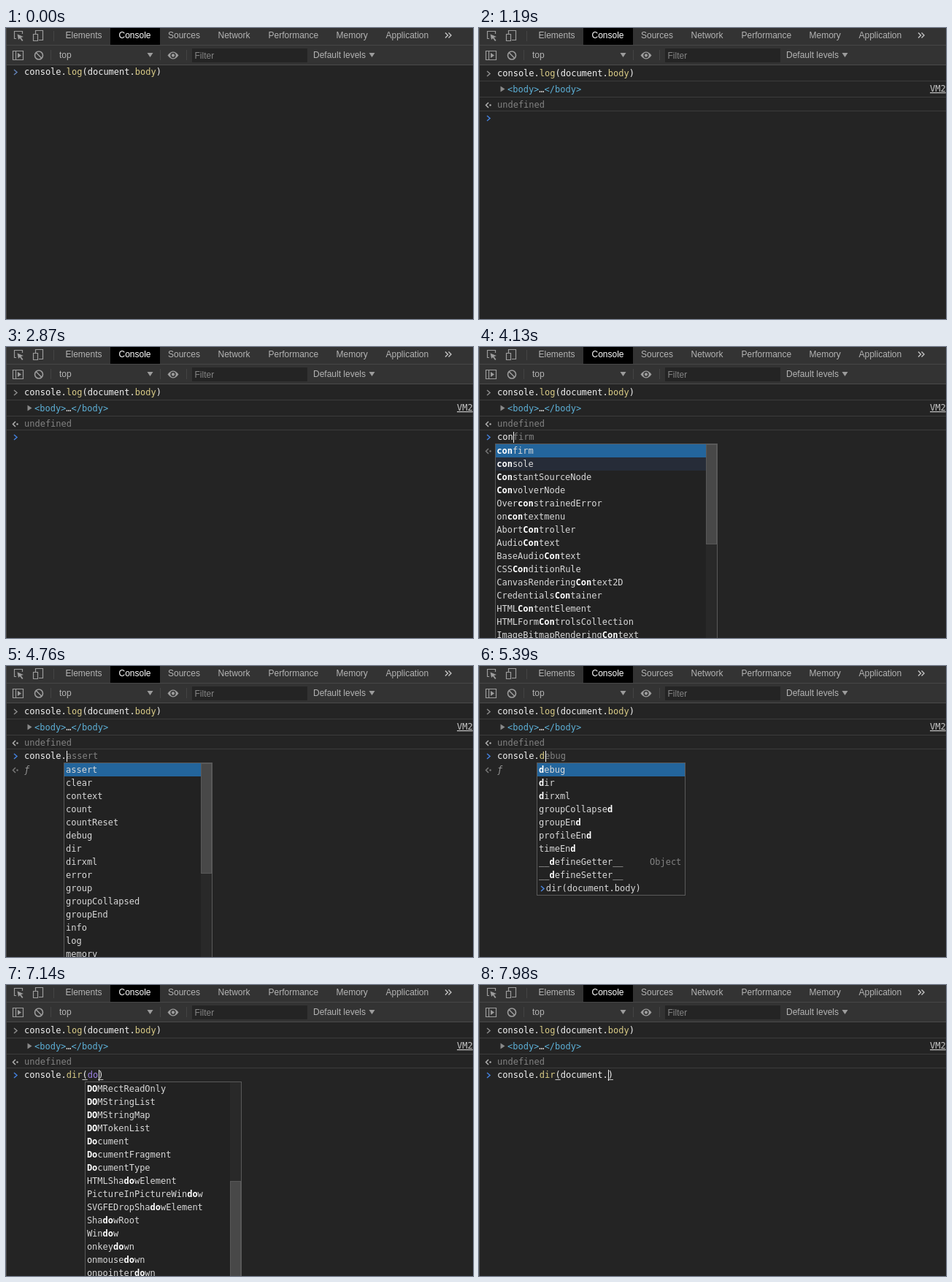
An HTML page for the animation above (8000 ms loop, 640 px wide and 398 px high).

```html
<!DOCTYPE html>
<html lang="en">
<head>
<meta charset="utf-8">
<title>Console session</title>
<style>
  html, body { margin: 0; width: 100%; height: 100%; overflow: hidden; background: #242424; }
  svg { display: block; width: 640px; height: 398px; }
  text { white-space: pre; fill: #d8d8d8; font: 12px "DejaVu Sans Mono", monospace; }
  .ui text { fill: #b4b4b4; font: 12px "Liberation Sans", sans-serif; }
  .ui text.on { fill: #fff; }
  .ui text.dim { fill: #858585; }
  .icon { fill: none; stroke: #9c9c9c; stroke-width: 1.2; }
  .rule { fill: #3c3c3c; }
  .code { fill: #f2f2f2; }
  .prop { fill: #d9cb86; }
  .key { fill: #9d83e6; }
  .tag { fill: #5db0d7; }
  .attr { fill: #9bbbdc; }
  .val { fill: #f29766; }
  .link { fill: #c4c4c4; text-decoration: underline; }
  .gray { fill: #828282; }
  .fn { fill: #9a9a9a; font-style: italic; }
  .hit { fill: #fff; font-weight: bold; }
  .chev { fill: none; stroke-width: 1.5; }
</style>
</head>
<body>
<svg viewBox="0 0 640 398">
  <rect width="640" height="398" fill="#242424"/>
  <g id="log"></g>
  <g class="ui">
    <rect width="640" height="50" fill="#333"/>
    <rect y="23" width="640" height="1" fill="#474747"/>
    <rect y="50" width="640" height="1" fill="#4a4a4a"/>
    <rect x="143" width="68" height="23" fill="#000"/>
    <path d="M65.5 4V18M61.5 30V44M211.5 30V44M247.5 30V44" stroke="#444"/>
    <g class="icon">
      <path d="M14 14.5H11.5V4.5H22.5V8"/>
      <path d="M15.5 8.5L24 12L20.5 13L23.5 17L22 18L19 14L17 16Z" fill="#9c9c9c" stroke="none"/>
      <path d="M40.5 8V3.5H50.5V16.5H45M37.5 8.5H43.5V17.5H37.5Z"/>
      <path d="M9.500 31.500H23.500V43.500H9.500ZM13.500 31.500V43.500"/>
      <path d="M16 34L21 37.500L16 41Z" fill="#9c9c9c" stroke="none"/>
      <circle cx="45" cy="37.500" r="5.500" stroke-width="1.600"/>
      <path d="M41 33.500L49 41.500" stroke-width="1.600"/>
      <path d="M221.500 37.500Q229 27.500 236.500 37.500Q229 47.500 221.500 37.500Z" fill="#9c9c9c" stroke="none"/>
      <circle cx="229" cy="37.500" r="2.900" stroke="#333" stroke-width="1.500"/>
      <path d="M602 6.500L605.500 10L602 13.500M606.500 6.500L610 10L606.500 13.500" stroke="#c4c4c4" stroke-width="1.400"/>
    </g>
    <path d="M193.500 34H201.500L197.500 40ZM497.500 34H505.500L501.500 40Z" fill="#9c9c9c"/>
    <rect x="255" y="28" width="158" height="19" fill="#242424"/>
    <text x="81.500" y="14">Elements</text>
    <text x="154.500" y="14" class="on">Console</text>
    <text x="222" y="14">Sources</text>
    <text x="290.500" y="14">Network</text>
    <text x="359.500" y="14">Performance</text>
    <text x="452.500" y="14">Memory</text>
    <text x="520.500" y="14">Application</text>
    <text x="73" y="41">top</text>
    <text x="258.500" y="42" class="dim">Filter</text>
    <text x="421" y="41">Default levels</text>
  </g>
  <g id="prompt"></g>
  <rect width="1" height="398" fill="#4c4c4c"/>
</svg>
<script>
const LOOP = 8000, CHAR = 7.224, LEFT = 25;
const logLayer = document.getElementById('log');
const promptLayer = document.getElementById('prompt');

const esc = s => s.replace(/&/g, '&amp;').replace(/</g, '&lt;');
const span = (cls, s) => `<tspan class="${cls}">${esc(s)}</tspan>`;
const line = (x, cy, body) => `<text x="${x}" y="${cy + 4}">${body}</text>`;
const box = (x, y, w, h, fill, extra = '') =>
  `<rect x="${x}" y="${y}" width="${w}" height="${h}" fill="${fill}" ${extra}/>`;
const rule = y => `<rect class="rule" x="1" y="${y}" width="639" height="1"/>`;
const chevron = (x, y, color) =>
  `<path class="chev" stroke="${color}" d="M${x - 2} ${y - 3}l4 3.500l-4 3.500"/>`;
const resultMark = (y, color) =>
  `<path class="chev" stroke="${color}" d="M13 ${y - 3}l-3.500 3.500l3.500 3.500"/>` +
  `<circle cx="15.500" cy="${y + .5}" r="1.200" fill="${color}"/>`;
const arrow = (x, y, open) =>
  `<path fill="#8a8a8a" d="${open ? `M${x - 4} ${y - 2}h8l-4 6z` : `M${x - 2.5} ${y - 3.5}v8l6-4z`}"/>`;

function highlight(code) {
  return code.split(/(\.\w+|\bdo\b)/).map(s =>
    s === 'do' ? span('key', s)
    : /^\.\w/.test(s) ? span('code', '.') + span('prop', s.slice(1))
    : span('code', s)).join('');
}

const COMMAND = 'console.log(document.body)';

function scriptRows(file, y) {
  return line(51, y, span('tag', '<script ') + span('attr', 'type') + span('tag', '="') +
      span('val', 'text/javascript') + span('tag', '" ') + span('attr', 'src') + span('tag', '="') +
      span('link', 'https://b-gold-cdn.xitu.io/v3/static/js/')) +
    line(51, y + 16, span('link', file) + span('tag', '"><\/script>'));
}

function history(open) {
  const end = open ? 252 : 105;
  let out = chevron(13, 62, '#8c8c8c') + line(LEFT, 62, highlight(COMMAND)) + rule(open ? 71 : 72) +
    line(618, open ? 82 : 83, span('link', 'VM2'));
  if (open) {
    out += arrow(32.5, 97, true) + line(39, 98, span('tag', '<body>')) +
      arrow(44, 114, false) +
      line(51, 115, span('tag', '<div ') + span('attr', 'id') + span('tag', '="') + span('val', 'juejin') +
        span('tag', '" ') + span('attr', 'data-v-5cbcd4ce') + span('tag', '>') + '…' + span('tag', '</div>')) +
      scriptRows('runtime.eedcca2….js', 132) +
      scriptRows('0.a25946e….js', 165) +
      scriptRows('1.87e5c6f….js', 198) +
      line(39, 231, span('tag', '</body>')) + rule(241) + rule(262);
  } else {
    out += arrow(32, 83, false) +
      line(39, 84, span('tag', '<body>') + '…' + span('tag', '</body>')) + rule(94) + rule(113);
  }
  return out + resultMark(end, '#b0b0b0') + line(LEFT, end, span('gray', 'undefined'));
}

// Popups: start column, typed match, outer width, items, optional thumb and selection
const words = s => s.split(' ');
const menus = {
  c: { col: 0, match: 'c', width: 305, thumb: [133, 30], items: words('caches cancelAnimationFrame cancelIdleCallback captureEvents case catch chrome class clear clearInterval clearTimeout clientInformation close closed confirm') },
  co: { col: 0, match: 'co', width: 305, thumb: [133, 80], items: words('confirm console const continue copy Comment CompositionEvent ConstantSourceNode ConvolverNode CountQueuingStrategy decodeURI decodeURIComponent encodeURI encodeURIComponent OverconstrainedError') },
  con: { col: 0, match: 'con', width: 305, thumb: [133, 136], hover: 1, items: words('confirm console ConstantSourceNode ConvolverNode OverconstrainedError oncontextmenu AbortController AudioContext BaseAudioContext CSSConditionRule CanvasRenderingContext2D CredentialsContainer HTMLContentElement HTMLFormControlsCollection ImageBitmapRenderingContext') },
  dot: { col: 8, match: '', width: 204, thumb: [133, 150], items: words('assert clear context count countReset debug dir dirxml error group groupCollapsed groupEnd info log memory') },
  d: { col: 8, match: 'd', width: 204, notes: { 7: 'Object' }, recall: 'dir(document.body)', items: words('debug dir dirxml groupCollapsed groupEnd profileEnd timeEnd __defineGetter__ __defineSetter__') },
  arg: { col: 12, match: 'd', width: 215, thumb: [133, 40], items: words('debug debugger decodeURI decodeURIComponent default defaultStatus defaultstatus delete devicePixelRatio dir dirxml dispatchEvent do document DataTransfer') },
  doTop: { col: 12, match: 'do', width: 215, thumb: [133, 140], items: words('document do DOMError DOMException DOMImplementation DOMMatrix DOMMatrixReadOnly DOMParser DOMPoint DOMPointReadOnly DOMQuad DOMRect DOMRectList DOMRectReadOnly DOMStringList') },
  doEnd: { col: 12, match: 'do', width: 215, thumb: [268, 140], selected: -1, items: words('DOMRectReadOnly DOMStringList DOMStringMap DOMTokenList Document DocumentFragment DocumentType HTMLShadowElement PictureInPictureWindow SVGFEDropShadowElement ShadowRoot Window onkeydown onmousedown onpointerdown') }
};

function marked(word, match) {
  const at = word.toLowerCase().indexOf(match), end = at + match.length;
  if (!match || at < 0) return esc(word);
  return esc(word.slice(0, at)) + span('hit', word.slice(at, end)) + esc(word.slice(end));
}

function popup({ col, match, width, items, thumb, selected = 0, hover, notes = {}, recall }) {
  const start = LEFT + col * CHAR, x = Math.floor(start - 3), inner = width - (thumb ? 16 : 1);
  const height = thumb ? 280 : (items.length + (recall ? 1 : 0)) * 18 + 1;
  let out = box(x + .5, 132.5, width - 1, height, '#222', 'stroke="#5a5a5a"');
  items.forEach((word, i) => {
    const y = 142 + i * 18;
    if (i === selected) out += box(x + 1, y - 9, inner - 1, 18, '#23659c');
    if (i === hover) out += box(x + 1, y - 9, inner - 1, 18, '#262c38');
    out += line(start - .8, y, marked(word, match));
    if (notes[i]) out += line(x + width - 49, y, span('gray', notes[i]));
  });
  if (recall) {
    const y = 142 + items.length * 18;
    out += chevron(x + 8, y, '#4a86e0') + line(start + 9, y, esc(recall));
  }
  if (thumb) {
    out += box(x + inner, 133, 15, 280, '#292929') +
      box(x + inner + .5, thumb[0] + .5, 14, thumb[1], '#484848', 'stroke="#585858"');
  }
  return out;
}

function prompt({ code = '', ghost = '', caret = code.length, menu, preview, y = 123, color = '#4480dc' }) {
  let out = chevron(13, y, color) +
    line(LEFT, y, highlight(code) + span('gray', ghost));
  if (preview !== undefined) out += resultMark(142, '#777') + line(LEFT, 142, span('fn', preview));
  if (code.includes('()') || code.includes('dir(')) {
    [code.indexOf('('), code.length - 1].forEach(i => {
      out += box(LEFT + i * CHAR, 129, CHAR, 1, '#c8c8c8');
    });
  }
  if (menu) out += popup(menus[menu]);
  if (caret >= 0) out += box(Math.round(LEFT + caret * CHAR + .5), y - 7, 1, 15, '#f0f0f0');
  return out;
}

const idle = { caret: -1 };
const steps = [
  [0, '', { code: COMMAND, caret: -1, y: 60, color: '#6180b4' }],
  [560, 'closed', idle],
  [1890, 'open', { caret: -1, y: 271 }],
  [2730, 'closed', idle],
  [3290, 'closed', { code: 'c', ghost: 'aches', menu: 'c' }],
  [3570, 'closed', { code: 'co', ghost: 'nfirm', menu: 'co' }],
  [3850, 'closed', { code: 'con', ghost: 'firm', menu: 'con', preview: '' }],
  [4480, 'closed', { code: 'console', preview: 'console {debug: ƒ, error: ƒ, info: ƒ, log: ƒ, warn: ƒ, …}' }],
  [4760, 'closed', { code: 'console.', ghost: 'assert', menu: 'dot', preview: 'ƒ' }],
  [5110, 'closed', { code: 'console.d', ghost: 'ebug', menu: 'd', preview: 'ƒ' }],
  [5460, 'closed', { code: 'console.dir', preview: 'ƒ dir() { [native code] }' }],
  [5810, 'closed', { code: 'console.dir()', caret: 12 }],
  [6230, 'closed', { code: 'console.dir(d)', caret: 13, menu: 'arg' }],
  [6580, 'closed', { code: 'console.dir(do)', caret: 14, menu: 'doTop' }],
  [7000, 'closed', { code: 'console.dir(do)', caret: 14, menu: 'doEnd' }],
  [7280, 'closed', { code: 'console.dir(document)', caret: 20 }],
  [7630, 'closed', { code: 'console.dir(document.)', caret: 21 }]
];

let shown = -1;
function draw() {
  const t = performance.now() % LOOP;
  const now = steps.findLastIndex(step => step[0] <= t);
  if (now !== shown) {
    const [, log, input] = steps[now];
    logLayer.innerHTML = log ? history(log === 'open') : '';
    promptLayer.innerHTML = prompt(input);
    shown = now;
  }
  requestAnimationFrame(draw);
}
draw();
</script>
</body>
</html>
```
